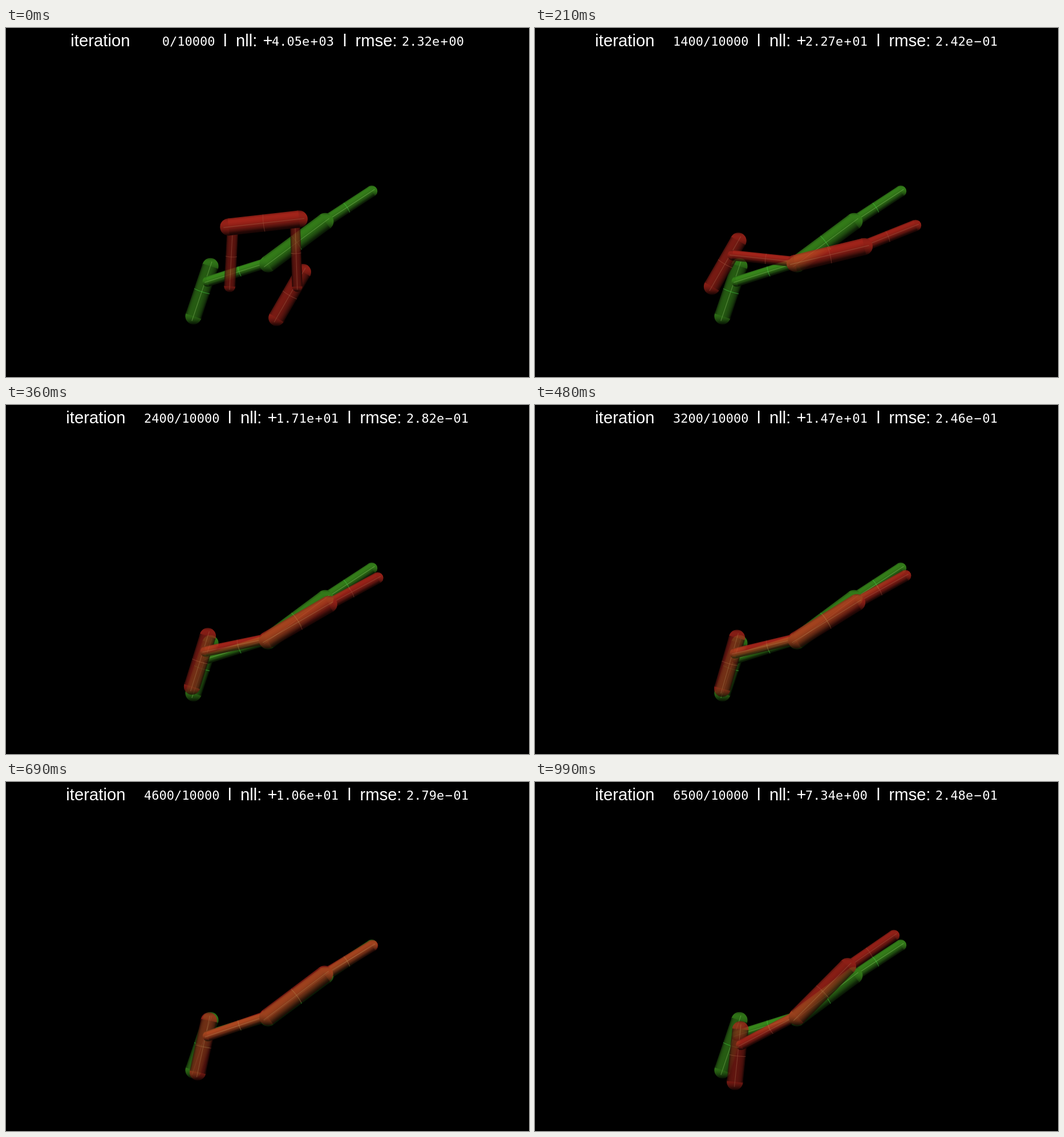
An HTML page with a canvas that plays this animation: 917x611 px, repeating every 2.02 s.

```html
<!DOCTYPE html>
<html lang="en">
<head>
<meta charset="utf-8">
<title>Pose fitting</title>
<style>
  html, body { margin: 0; width: 100%; height: 100%; overflow: hidden; background: #000; }
  canvas { position: absolute; left: 0; top: 0; }
  #fit { opacity: .72; }
</style>
</head>
<body>
<canvas id="goal" width="917" height="611"></canvas>
<canvas id="fit" width="917" height="611"></canvas>
<canvas id="label" width="917" height="611"></canvas>
<script>
const ctx = id => document.getElementById(id).getContext('2d');
const goal = ctx('goal'), fit = ctx('fit'), label = ctx('label');
const GREEN = { base: [66, 160, 32], axis: 'rgba(150,205,110,.4)', ring: 'rgba(70,215,70,.5)' };
const RED = { base: [261, 58, 42], axis: 'rgba(235,165,125,.35)', ring: 'rgba(235,125,95,.4)' };
const STEP = 30, LAST = 33, LOOP = 2020, ARRIVE = 7;

// Pose: hip x, hip y, then the directions of torso, arm, leg and foot in degrees.
const TARGET = [459.5, 413, 323.4, 326.8, 162.5, 108.7];
const FIRST = [514, 334.5, 173.6, 93, 88, 120];
const NEAR = [456, 412, 346.4, 338.3, 186, 120];
const FINAL = [460, 411, 315, 325.5, 152.3, 96];

// [step, nll, rmse]
const READINGS = [
  [0, 4050, 2.32], [7, 22.7, .242], [12, 17.1, .282], [16, 14.7, .246],
  [23, 10.6, .279], [28, 11.6, .283], [33, 7.34, .248]
];

const mix = (a, b, u) => a + (b - a) * u;
const easeOut = u => 1 - (1 - u) ** 3;

// A quick approach, then a slowing drift with a slight wobble.
function poseAt(step) {
  const blend = (from, to, u) => from.map((v, i) => mix(v, to[i], u));
  if (step < ARRIVE) return blend(FIRST, NEAR, easeOut(step / ARRIVE));
  const v = (step - ARRIVE) / (LAST - ARRIVE);
  return blend(NEAR, FINAL, Math.sqrt(v) + .09 * Math.sin(3 * Math.PI * v));
}

function readingsAt(step) {
  const i = Math.max(1, READINGS.findIndex(r => r[0] >= step));
  const [from, ...a] = READINGS[i - 1], [to, ...b] = READINGS[i];
  const u = (step - from) / (to - from);
  return a.map((v, j) => v * (b[j] / v) ** (i === 1 ? easeOut(u) : u));
}

// Light across a round surface; `up` is how far the +y side faces upwards.
function shade(g, y, r, up, dim, base) {
  const fill = g.createLinearGradient(0, y - r, 0, y + r);
  for (let s = -1; s <= 1; s += .25) {
    const light = Math.max(.12, .2 + .5 * Math.sqrt(1 - s * s) + .45 * up * s) * dim;
    fill.addColorStop((s + 1) / 2, `rgb(${base.map(c => Math.round(c * light))})`);
  }
  return fill;
}

function limb(g, [ax, ay], [bx, by], r, { base, axis, ring }) {
  const angle = Math.atan2(by - ay, bx - ax), len = Math.hypot(bx - ax, by - ay);
  const dim = .7 + .3 * Math.abs(Math.cos(angle));
  for (const [x, y] of [[ax, ay], [bx, by]]) {
    g.fillStyle = shade(g, y, r, -.7, (dim + 1) / 2, base);
    g.beginPath();
    g.arc(x, y, r, 0, 7);
    g.fill();
  }
  g.save();
  g.translate(ax, ay);
  g.rotate(angle);
  g.fillStyle = shade(g, 0, r, -Math.cos(angle), dim, base);
  g.fillRect(0, -r, len, 2 * r);
  g.lineWidth = 1.1;
  g.strokeStyle = axis;
  g.beginPath();
  g.moveTo(-r * .6, 0);
  g.lineTo(len + r * .6, 0);
  g.stroke();
  g.strokeStyle = ring;
  g.beginPath();
  g.moveTo(len / 2, -r);
  g.quadraticCurveTo(len / 2 + 2, 0, len / 2, r);
  g.stroke();
  g.restore();
}

function drawBody(g, [hx, hy, torso, arm, leg, foot], color) {
  const go = ([x, y], degrees, d) => {
    const a = degrees * Math.PI / 180;
    return [x + d * Math.cos(a), y + d * Math.sin(a)];
  };
  const hip = [hx, hy], chest = go(hip, torso, 124.5);
  const socket = go(hip, torso, 7.5), shoulder = go(hip, torso, 117);
  const tip = go(shoulder, arm, 105);
  const knee = go(socket, leg, 117.5);
  const heel = go(go(knee, foot, -27), foot + 90, 4);
  const toe = go(heel, foot, 92.5);
  g.clearRect(0, 0, 917, 611);
  limb(g, heel, toe, 14.3, color);
  limb(g, shoulder, tip, 10, color);
  limb(g, socket, knee, 9, color);
  limb(g, hip, chest, 15, color);
}

function drawLabel(step, nll, rmse) {
  const count = String(Math.min(step * 200, 6500));
  const shift = 8 * (count.length - 1) / 3;
  const g = label;
  g.clearRect(0, 0, 917, 611);
  g.fillStyle = '#fff';
  const sans = (text, x) => {
    g.font = '29.3px "Liberation Sans", Arial, sans-serif';
    g.fillText(text, x, 31.5);
  };
  const mono = (text, x) => {
    g.font = '22px "DejaVu Sans Mono", monospace';
    g.fillText(text, x, 31);
  };
  const scientific = (value, x) => {
    const [mantissa, power] = value.toExponential(2).split('e');
    mono(mantissa + 'e', x);
    mono(power < 0 ? '\u2212' : '+', x + 67.7);
    mono(String(Math.abs(power)).padStart(2, '0'), x + 82.5);
  };
  sans('iteration', 113.3 - shift);
  g.textAlign = 'right';
  mono(count + '/10000', 366.5 + shift);
  g.textAlign = 'left';
  sans('l', 381 + shift);
  sans('nll:', 403 + shift);
  sans('+', 450.5 + shift);
  scientific(nll, 466 + shift);
  sans('l', 590.7 + shift);
  sans('rmse:', 612.5 + shift);
  scientific(rmse, 694 + shift);
}

drawBody(goal, TARGET, GREEN);
const start = performance.now();
let shown = -1;
function frame() {
  const time = (performance.now() - start) % LOOP;
  const step = Math.min(LAST, Math.floor(time / STEP));
  if (step !== shown) {
    drawBody(fit, poseAt(step), RED);
    drawLabel(step, ...readingsAt(step));
    shown = step;
  }
  requestAnimationFrame(frame);
}
frame();
</script>
</body>
</html>
```
